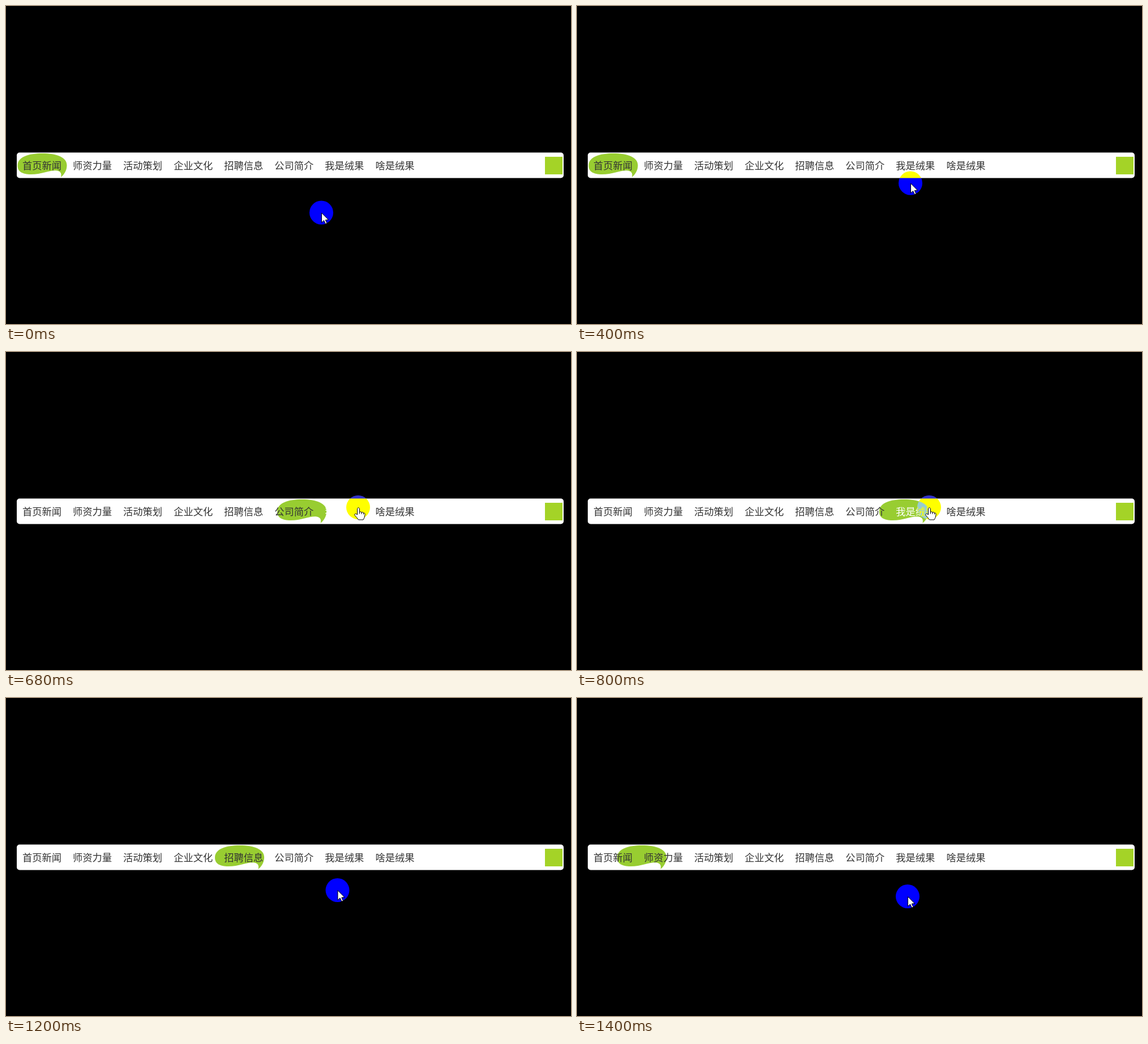
An HTML page with a canvas that plays this animation: 998x561 px, repeating every 1.44 s.

```html
<!DOCTYPE html>
<html lang="zh-CN">
<head>
<meta charset="utf-8">
<style>
  html, body { margin: 0; width: 100%; height: 100%; overflow: hidden; background: #000; }
  canvas { display: block; }
</style>
</head>
<body>
<canvas id="stage" width="998" height="561"></canvas>
<script>
const c = document.getElementById('stage').getContext('2d');
const LOOP = 1440, STEP = 40, PITCH = 89.06, HOME = 20;
const LABELS = ['首页新闻', '师资力量', '活动策划', '企业文化', '招聘信息', '公司简介', '我是绒果', '啥是绒果'];
const HOVERED = 6;
const TARGET = HOME + HOVERED * PITCH;

// Pointer path: time, x, y; repeated times are jumps
const PATH = [
  [0, 557, 364.5], [40, 557, 364.5], [160, 559, 361.5], [399, 559, 361.5],
  [400, 589, 312.5], [440, 599, 305], [480, 609, 295], [520, 618, 283],
  [560, 621, 277], [640, 622, 274], [1119, 622, 274],
  [1120, 611, 293], [1160, 597, 318], [1200, 585.5, 339],
  [1240, 584, 347], [1280, 584, 350], [1440, 584, 350]
];

const bubble = new Path2D('M.5 281C1 266 20 260 44 260C70 260 87.5 267 87.5 281C87.5 290 83 297 77 302C78.5 296 77 291.5 70 290.5C58 289 45 297 24 297C9 297 0 292 .5 281Z');
const arrow = new Path2D('M0 0V17L4 13.3L7 19.5L9.5 18.3L6.8 12.5L12 12Z');
const hand = new Path2D('M-2 2Q0-2 2 2V8Q4 6 5.5 8.5Q8 7 9 9.5Q12 9 11.5 13Q11 18 8.5 21.5H0Q-3 17-7 13Q-6 9-2 12.5Z');
const knuckles = new Path2D('M2 8V11M5.5 8.5V11.5M9 9.5V12');

function pointerAt(t) {
  const i = PATH.findIndex(p => p[0] > t);
  const [t0, x0, y0] = PATH[i - 1], [t1, x1, y1] = PATH[i];
  const k = (t - t0) / (t1 - t0);
  return [x0 + (x1 - x0) * k, y0 + (y1 - y0) * k];
}

// Share of the way still to go: exponential approach that ends at zero
function rest(ms) {
  return ms < 0 ? 1 : Math.max(0, 1.012 * Math.exp(-0.00915 * ms) - 0.012);
}

function bubbleAt(t) {
  return t < 1154 ? TARGET - (TARGET - HOME) * rest(t - 474)
                  : HOME + (TARGET - HOME) * rest(t - 1154);
}

function disc(x, y, color) {
  c.fillStyle = color;
  c.beginPath();
  c.arc(x, y, 21, 0, 7);
  c.fill();
}

function drawBar(t, hover) {
  c.fillStyle = '#fff';
  c.beginPath();
  c.roundRect(19, 258.5, 966, 45, 5);
  c.fill();
  c.fillStyle = '#a4d327';
  c.fillRect(952, 266, 31, 31);

  const x = bubbleAt(t);
  c.fillStyle = '#98cd31';
  c.translate(x, 0);
  c.fill(bubble);
  c.translate(-x, 0);

  c.font = '17.25px "Noto Sans CJK SC", "Noto Sans CJK", sans-serif';
  LABELS.forEach((label, i) => {
    c.fillStyle = hover && i === HOVERED ? '#fff' : '#333';
    c.fillText(label, 29 + i * PITCH, 288.4);
  });
}

function drawPointer(x, y, hover) {
  c.globalCompositeOperation = 'difference';
  disc(x, y, '#00f');
  c.globalCompositeOperation = 'source-over';
  c.save();
  c.translate(x + 0.5, y + 0.5);
  c.fillStyle = '#fff';
  c.strokeStyle = '#000';
  c.lineWidth = 1;
  const shape = hover ? hand : arrow;
  c.fill(shape);
  c.stroke(shape);
  if (hover) c.stroke(knuckles);
  c.restore();
}

function draw(now) {
  let t = Math.floor(now % LOOP / STEP) * STEP;
  if (t > 1000 && t < 1120) t = 1000;
  const [x, y] = pointerAt(t);
  const hover = y < 303;
  c.fillStyle = '#000';
  c.fillRect(0, 0, 998, 561);
  if (hover) disc(x, y, '#333337'); // dulls the part of the disc above the bar
  drawBar(t, hover);
  drawPointer(x, y, hover);
}

const start = performance.now();
function tick() {
  draw(performance.now() - start);
  requestAnimationFrame(tick);
}
tick();
</script>
</body>
</html>
```
